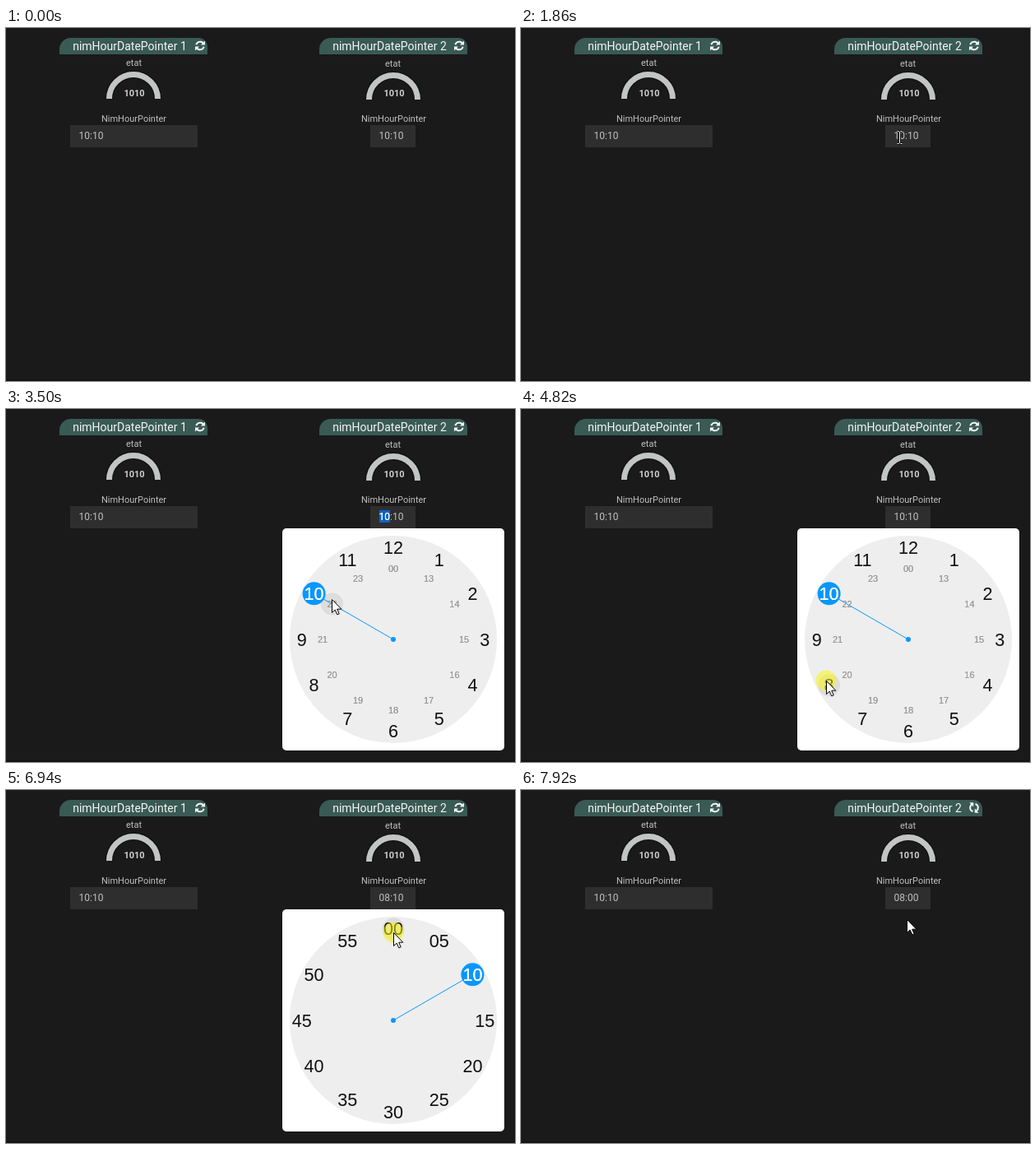
Write an HTML page with a canvas that moves like this. It is 619 by 429 pixels and loops after 8 s.

```html
<!DOCTYPE html>
<html lang="en">
<head>
<meta charset="utf-8">
<title>Clock time picker</title>
<style>
  html, body { margin: 0; width: 100%; height: 100%; overflow: hidden; background: #1a1a1a; }
  canvas { display: block; }
</style>
</head>
<body>
<canvas id="stage" width="619" height="429"></canvas>
<script>
const ctx = document.getElementById('stage').getContext('2d');
const TAU = Math.PI * 2, LOOP = 8000;
const OPEN = 2560, PICK_HOUR = 4820, MINUTES = 5060, PICK_MINUTE = 6940, CLOSE = 7150;
const SPIN = 7400, FADE = 500, CX = 471, CY = 280, OUTER = 111.3, INNER = 86;
const UI = 'Roboto, sans-serif', FACE = '"Liberation Sans", Arial, sans-serif';

// time, x, y of the pointer tip
const PATH = [
  [760, 518, 359], [1540, 467, 150], [1860, 460, 132], [3100, 460, 132],
  [3500, 396, 231], [3700, 371, 275], [3960, 367, 320], [4200, 367, 330],
  [4500, 367, 330], [4580, 371, 330], [5480, 371, 330], [5600, 382, 321],
  [5840, 434, 274], [6200, 464, 205], [6540, 471, 173], [7150, 471, 173],
  [7500, 469, 157]
];
// start, end, x, y of each click mark
const CLICKS = [
  [OPEN, 2800, 458, 132], [PICK_HOUR, MINUTES, 371, 330], [PICK_MINUTE, CLOSE, 471, 173]
];

function pointerAt(t) {
  if (t < PATH[0][0]) return null;
  const i = PATH.findIndex(p => p[0] > t);
  if (i < 0) return PATH[PATH.length - 1].slice(1);
  const [t0, x0, y0] = PATH[i - 1], [t1, x1, y1] = PATH[i];
  const k = (t - t0) / (t1 - t0);
  return [x0 + (x1 - x0) * k, y0 + (y1 - y0) * k];
}

function text(str, x, y, font, color, align = 'center') {
  ctx.font = font;
  ctx.fillStyle = color;
  ctx.textAlign = align;
  ctx.fillText(str, x, y);
}

// a second pass firms up the soft glyph edges
function firmText(...args) {
  text(...args);
  text(...args);
}

function rect(x, y, w, h, color, radius = 0) {
  ctx.fillStyle = color;
  ctx.beginPath();
  ctx.roundRect(x, y, w, h, radius);
  ctx.fill();
}

function disc(x, y, r, color) {
  ctx.fillStyle = color;
  ctx.beginPath();
  ctx.arc(x, y, r, 0, TAU);
  ctx.fill();
}

function halfRing(x, y, r, width, color) {
  ctx.strokeStyle = color;
  ctx.lineWidth = width;
  ctx.beginPath();
  ctx.arc(x, y, r, Math.PI, TAU);
  ctx.stroke();
}

function refreshIcon(x, y, angle) {
  ctx.save();
  ctx.translate(x, y);
  ctx.rotate(angle);
  ctx.strokeStyle = ctx.fillStyle = '#f4f6f5';
  ctx.lineWidth = 2.1;
  for (let i = 0; i < 2; i++) {
    ctx.beginPath();
    ctx.arc(0, 0, 4.8, Math.PI * 1.08, Math.PI * 1.8);
    ctx.stroke();
    ctx.beginPath();
    ctx.moveTo(6, -6);
    ctx.lineTo(6, -1);
    ctx.lineTo(1, -1);
    ctx.fill();
    ctx.rotate(Math.PI);
  }
  ctx.restore();
}

function widget(n, left, drop, boxX, boxW, spin) {
  const mid = left + 90;
  rect(left, 12, 180, 20, '#3a5a54', [14, 11, 0, 0]);
  text('nimHourDatePointer ' + n, mid - 4.5, 27, '14px ' + UI, '#f4f6f5');
  refreshIcon(left + 171 - drop, 21.5, spin);
  text('etat', mid + 0.5 - drop, 46 + drop, '11px ' + UI, '#bfbfbf');
  halfRing(mid, 86 + drop, 29.5, 10, '#131313');
  halfRing(mid, 86 + drop, 29.5, 7, '#c1c5c3');
  text('1010', mid + 1, 83, 'bold 11px ' + UI, '#d0d0d0');
  text('NimHourPointer', mid + 0.5, 114, '11px ' + UI, '#bfbfbf');
  rect(boxX, 118, boxW, 27, '#2e2e2e');
}

function timeInput(t) {
  const value = t < MINUTES ? '10:10' : t < CLOSE ? '08:10' : '08:00';
  const font = '12px ' + UI;
  text(value, 453.5, 135, font, '#c0c0c0', 'left');
  const hours = t >= OPEN && t < PICK_HOUR;
  const minutes = t >= MINUTES && t < PICK_MINUTE;
  if (!hours && !minutes) return;
  const x = hours ? 453.5 : 453.5 + ctx.measureText('08:').width;
  rect(Math.round(x), 123, 13, 15, '#0a63cc');
  firmText(hours ? value.slice(0, 2) : value.slice(3), x, 135, font, '#fff', 'left');
}

// point on the dial for a fraction of a full turn
const onDial = (turn, r) => [CX + r * Math.sin(turn * TAU), CY - r * Math.cos(turn * TAU)];

function hoverSpot([x, y], isHours) {
  const dx = x - CX, dy = y - CY, r = Math.hypot(dx, dy);
  if (r < 65 || r > 130) return null;
  const parts = isHours ? 12 : 60;
  const turn = Math.round(Math.atan2(dx, -dy) / TAU * parts) / parts;
  return onDial(turn, isHours && r < 98 ? INNER : OUTER);
}

function dial(isHours, pointer) {
  disc(CX, CY, 126, '#eee');
  const spot = hoverSpot(pointer, isHours);
  if (spot) disc(...spot, 13.5, '#ddd');

  const chosen = isHours ? 10 : 2;
  const tip = onDial(chosen / 12, OUTER);
  ctx.strokeStyle = '#0797ff';
  ctx.lineWidth = 1;
  ctx.beginPath();
  ctx.moveTo(CX, CY);
  ctx.lineTo(...tip);
  ctx.stroke();
  disc(CX, CY, 3, '#0797ff');
  disc(...tip, 14, '#0797ff');

  const pad = n => String(n).padStart(2, '0');
  for (let i = 0; i < 12; i++) {
    const [x, y] = onDial(i / 12, OUTER);
    const label = isHours ? String(i || 12) : pad(i * 5);
    const write = i === chosen ? firmText : text;
    write(label, x, y + 7.7, '21.6px ' + FACE, i === chosen ? '#fff' : '#111');
    if (isHours) {
      const [u, v] = onDial(i / 12, INNER);
      firmText(i ? String(i + 12) : '00', u, v + 4, '11px ' + FACE, '#999');
    }
  }
}

function popup(t, pointer) {
  rect(336, 145, 270, 270, '#fff', 5);
  const k = Math.min(1, Math.max(0, (t - MINUTES) / FADE));
  if (k < 1) dial(true, pointer);
  if (k > 0) {
    ctx.globalAlpha = 0.5 - Math.cos(k * Math.PI) / 2;
    dial(false, pointer);
    ctx.globalAlpha = 1;
  }
}

function drawPointer([x, y]) {
  ctx.save();
  ctx.translate(Math.round(x) + 0.5, Math.round(y) + 0.5);
  const overInput = x > 443 && x < 498 && y > 118 && y < 145;
  const shape = new Path2D(overInput
    ? 'M-3-7H-1L0-6L1-7H3M0-6V7M-3 8H-1L0 7L1 8H3'
    : 'M0 0V16L3.7 12.6L6.3 18.4L8.7 17.4L6.2 11.7H11.3Z');
  if (overInput) {
    ctx.strokeStyle = '#111';
    ctx.lineWidth = 3;
    ctx.stroke(shape);
    ctx.strokeStyle = '#eee';
  } else {
    ctx.fillStyle = '#fff';
    ctx.fill(shape);
    ctx.strokeStyle = '#000';
  }
  ctx.lineWidth = 1;
  ctx.stroke(shape);
  ctx.restore();
}

function draw(t) {
  rect(0, 0, 619, 429, '#1a1a1a');
  rect(0, 427, 619, 2, '#141414');
  rect(618, 0, 1, 429, '#141414');
  const spin = Math.max(0, t - SPIN) / 2000 * TAU;
  widget(1, 65, 0, 78, 155, 0);
  text('10:10', 88.5, 135, '12px ' + UI, '#c0c0c0', 'left');
  widget(2, 381, 1, 443, 55, spin);
  timeInput(t);

  const pointer = pointerAt(t);
  if (t >= OPEN && t < CLOSE) popup(t, pointer);
  for (const [from, to, x, y] of CLICKS)
    if (t >= from && t < to) disc(x, y, 12.5, 'rgba(250, 246, 10, 0.52)');
  if (pointer) drawPointer(pointer);
}

const start = performance.now();
function frame() {
  draw((performance.now() - start) % LOOP);
  requestAnimationFrame(frame);
}
frame();
</script>
</body>
</html>
```
